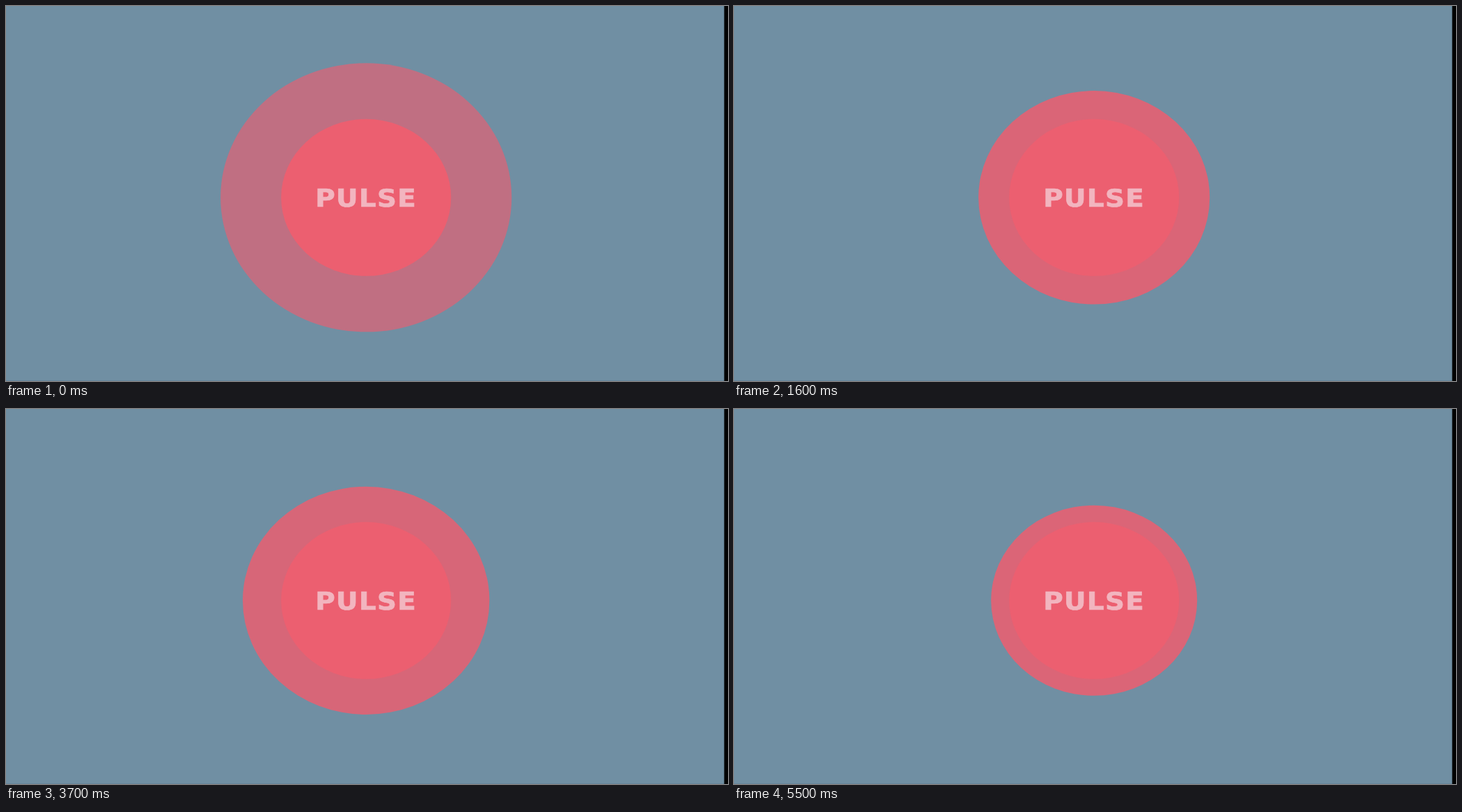
Write an HTML page that moves like this. It is 1037 by 540 pixels and loops after 5600 ms.

```html
<!DOCTYPE html>
<html lang="en">
<head>
<meta charset="utf-8">
<title>Pulse</title>
<style>
  html, body { margin: 0; width: 100%; height: 100%; overflow: hidden; background: #708fa3; }
  svg { display: block; width: 1037px; height: 540px; }
  circle { fill: #ec5f70; }
  text {
    font: bold 36px "DejaVu Sans", sans-serif;
    letter-spacing: 1.2px;
    text-anchor: middle;
    fill: #f2b5bf;
    stroke: #f2b5bf;
    stroke-width: .7px;
  }
</style>
</head>
<body>
<svg viewBox="0 0 1037 540">
  <rect width="1037" height="540" fill="#708fa3"/>
  <rect y="539" width="1037" height="1" fill="#66859a"/>
  <rect x="1031.5" width="5.5" height="540"/>
  <g transform="translate(517.2 275.8) scale(1.08 1)">
    <circle id="ring" r="113"/>
    <circle r="113"/>
    <text y="13.6">PULSE</text>
  </g>
</svg>
<script>
  const LOOP = 5600, STEP = 100, PERIOD = 1000, START = 400;
  const RADIUS = 113, ALPHA = 0.87;
  // progress of the pulse -> growth of the radius
  const GROWTH = [[0, 0], [.1, .213], [.2, .361], [.4, .543], [.6, .713], [.8, .885], [.9, .95], [1, 1]];
  const ring = document.getElementById('ring');

  function growth(p) {
    const i = GROWTH.findIndex(([x], k) => k > 0 && p <= x);
    const [x0, y0] = GROWTH[i - 1], [x1, y1] = GROWTH[i];
    return y0 + (y1 - y0) * (p - x0) / (x1 - x0);
  }

  function draw(time) {
    const t = Math.floor((time % LOOP) / STEP) * STEP;
    const p = ((t - START + PERIOD) % PERIOD) / PERIOD;
    ring.setAttribute('r', RADIUS * (1 + growth(p)));
    ring.setAttribute('opacity', ALPHA * (1 - p ** 2.7));
  }

  const begin = performance.now();
  function tick() {
    draw(performance.now() - begin);
    requestAnimationFrame(tick);
  }
  tick();
</script>
</body>
</html>
```
